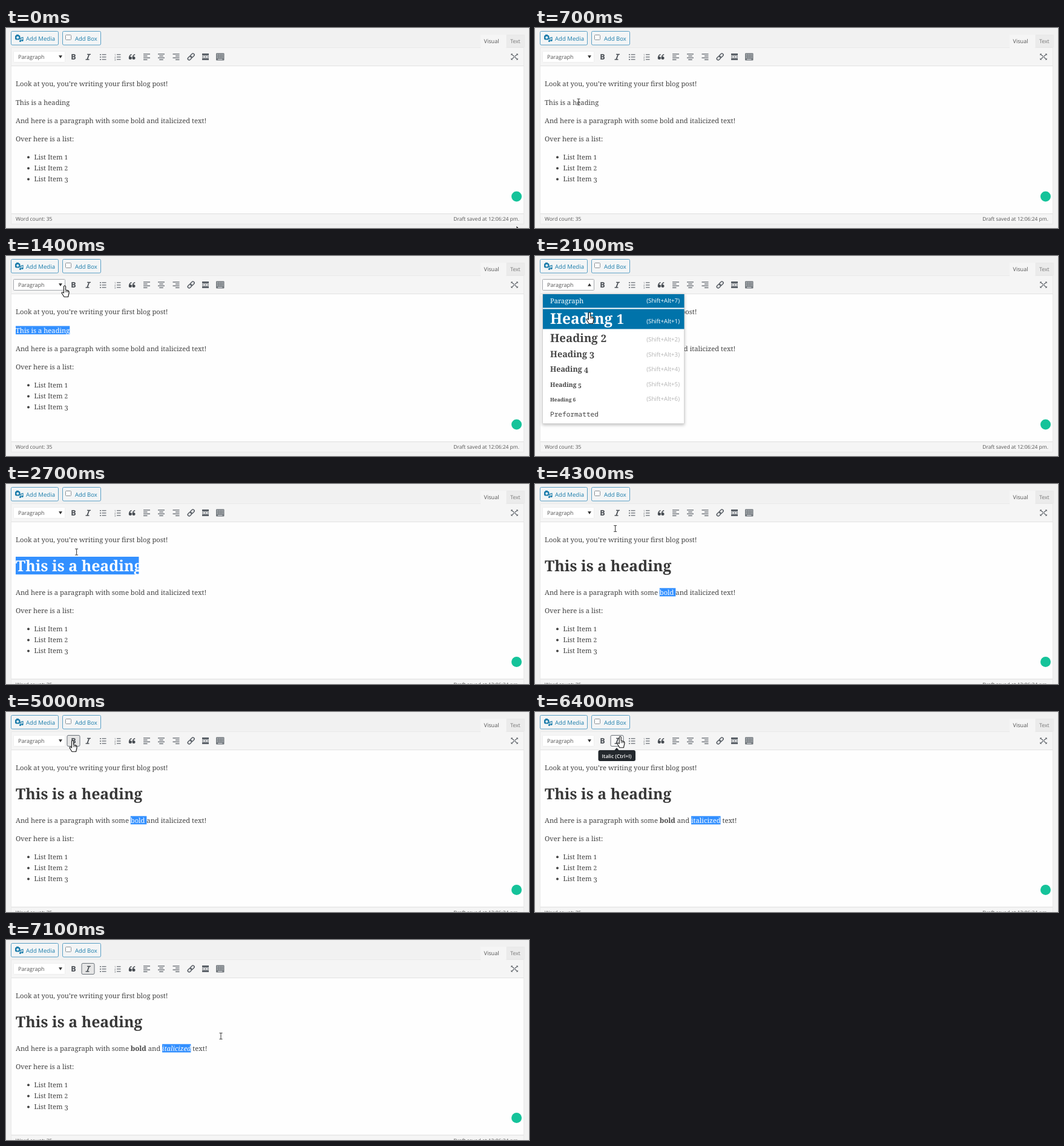
Write an HTML page with a canvas that moves like this. It is 864 by 330 pixels and loops after 7200 ms.

```html
<!DOCTYPE html>
<html lang="en">
<head>
<meta charset="utf-8">
<title>Post editor</title>
<style>
  html, body { margin: 0; width: 100%; height: 100%; overflow: hidden; background: #f1f1f1; }
  canvas { display: block; width: 864px; height: 330px; }
</style>
</head>
<body>
<canvas id="stage" width="864" height="330"></canvas>
<script>
const ctx = document.getElementById('stage').getContext('2d');
ctx.textRendering = 'geometricPrecision';

const LOOP = 7200, STEP = 100;
const INK = '#444', ICON = '#5d636a', DARK = '#474c52';
const BLUE = '#0073aa', SELECT = '#3390ff', LINK = '#1a7cab', EDGE = '#5a9fc5';
const BODY = 11.2;

// Moments at which the editor state changes
const AT = {
  pickHeading: 800, openMenu: 1700, applyHeading: 2400, pickBold: 3400, pressBold: 4900,
  applyBold: 5100, pickItalic: 5600, tip: 6200, applyItalic: 6500
};

// Pointer stops: time, x, y
const PATH = [
  [0, 843, 326], [700, 72, 122], [900, 72, 122], [1400, 97, 49], [1500, 92, 48], [1700, 92, 48],
  [2100, 90, 93], [2500, 90, 95], [3200, 224, 181], [3800, 224, 181], [4500, 110, 47],
  [5100, 110, 47], [5500, 283, 179], [5700, 283, 179], [6200, 140, 41], [6500, 141, 40],
  [7100, 355, 158.5], [7200, 355, 158.5]
];

function pointerAt(t) {
  const i = Math.max(1, PATH.findIndex(stop => stop[0] > t));
  const [t0, x0, y0] = PATH[i - 1], [t1, x1, y1] = PATH[i];
  const u = (t - t0) / (t1 - t0), e = u * u * (3 - 2 * u);
  return { x: x0 + (x1 - x0) * e, y: y0 + (y1 - y0) * e };
}

function box(x, y, w, h, fill, stroke, radius = 0) {
  ctx.beginPath();
  ctx.roundRect(x, y, w, h, radius);
  if (fill) { ctx.fillStyle = fill; ctx.fill(); }
  if (stroke) { ctx.strokeStyle = stroke; ctx.lineWidth = 1; ctx.stroke(); }
}

function dot(x, y, r, fill) {
  ctx.beginPath();
  ctx.arc(x, y, r, 0, Math.PI * 2);
  ctx.fillStyle = fill;
  ctx.fill();
}

function poly(points, fill, stroke, width = 1) {
  ctx.beginPath();
  points.forEach(([x, y]) => ctx.lineTo(x, y));
  if (fill) { ctx.closePath(); ctx.fillStyle = fill; ctx.fill(); }
  if (stroke) { ctx.strokeStyle = stroke; ctx.lineWidth = width; ctx.stroke(); }
}

function text(str, x, y, size, color, { weight = '', family = '"Open Sans", sans-serif', align = 'left' } = {}) {
  ctx.font = `${weight} ${size}px ${family}`;
  ctx.textAlign = align;
  ctx.fillStyle = color;
  ctx.fillText(str, x, y);
  return ctx.measureText(str).width;
}

// Serif text with old-style figures; returns the x where it ends
function serif(str, x, y, size, color, weight = '') {
  for (const part of str.split(/(\d)/)) {
    const small = /^[12]$/.test(part), low = /^[345]$/.test(part);
    x += text(part, x, y + (low ? size * 0.15 : 0), small ? size * 0.9 : size, color,
      { weight, family: '"Noto Serif", serif' });
  }
  return x;
}

// One line of styled runs, each optionally selected
function runs(list, x, y, size = BODY) {
  for (const { str, weight = '', selected, color = INK } of list) {
    if (selected) {
      ctx.font = `${weight} ${size}px "Noto Serif", serif`;
      box(x, y - size * 0.98, ctx.measureText(str).width, size * 1.22, SELECT);
    }
    // Bold letters run slightly wider
    x = serif(str, x, y, weight === 'bold' ? size * 1.03 : size, selected ? '#fff' : color, weight);
  }
}

function drawFrame(shift) {
  box(0, 0, 864, 330, '#f1f1f1');
  box(8.5, 32.5, 847, 291 + shift, '#f5f5f5', '#e9e9e9');
  box(784, 11, 42, 22, '#f5f5f5');
  box(827.5, 11.5, 29, 20, '#ebebeb', '#e8e8e8');
  text('Visual', 789.5, 25, 9.1, '#555');
  text('Text', 833, 25, 8.8, '#777');
  box(9, 62, 846, 244 + shift, '#fefefe');
  box(9, 62, 846, 1, '#e2e2e2');
  box(9, 306 + shift, 846, 1, '#dedede');
  text('Word count: 35', 16, 318 + shift, 8.5, '#555');
  text('Draft saved at 12:06:24 pm.', 848, 318 + shift, 8.5, '#555', { align: 'right' });
  dot(843.5, 278 + shift, 8.5, '#15c39a');
}

function drawMediaButtons() {
  box(8.5, 5.5, 78, 22.5, '#f3f5f6', EDGE, 2);
  box(93.5, 5.5, 63, 22.5, '#f3f5f6', EDGE, 2);
  text('Add Media', 33, 21, 9.6, LINK);
  text('Add Box', 114, 21, 9.5, LINK);
  box(98.5, 11.5, 9, 8, '#fff', '#8a8f94', 1);
  // Camera and note
  box(15, 12, 8.5, 7.5, LINK, null, 2);
  box(17, 10.8, 4, 2, LINK);
  dot(19.3, 15.8, 2, '#f3f5f6');
  dot(23.5, 21.5, 1.6, LINK);
  dot(27, 20.5, 1.6, LINK);
  poly([[24.6, 21.5], [24.6, 16.5], [28, 15.5], [28, 20.5]], null, LINK, 1.1);
}

function drawTools(state) {
  const { hoverList, menuOpen, bold, italic, pointer } = state;
  box(12.5, 38.5, 85, 18, '#fff', hoverList ? '#a5a9ad' : '#eee', 1);
  text('Paragraph', 20, 51, 9.05, '#555');
  const a = menuOpen ? -1 : 1;
  poly([[87, 47.5 - 2.2 * a], [93, 47.5 - 2.2 * a], [90, 47.5 + 2.6 * a]], '#333');

  const button = (cx, active) => {
    const over = Math.abs(pointer.x - cx) < 11 && Math.abs(pointer.y - 47.5) < 10;
    if (active || over) box(cx - 10.5, 38.5, 21, 18, active ? '#e6e6e6' : '#fafafa', '#6a7178', 2);
  };
  button(111.5, bold);
  button(135.5, italic);
  text('B', 111.5, 52, 12.5, DARK, { weight: 'bold', align: 'center' });
  poly([[134, 43.5], [140, 43.5]], null, DARK, 1.4);
  poly([[137.3, 43.5], [134.2, 52]], null, DARK, 1.7);
  poly([[131.5, 52], [137.5, 52]], null, DARK, 1.4);

  const bar = (x, y, w, h = 1.2) => box(x, y, w, h, ICON);
  for (let i = 0; i < 3; i++) {
    const y = 43.3 + i * 4;
    dot(156, y + 0.6, 1, ICON);
    bar(158.5, y, 7);
    text(String(i + 1), 179, y + 2.3, 4.4, ICON);
    bar(183, y, 6.5);
  }
  for (const x of [205.3, 211]) {
    dot(x, 49.5, 2.5, DARK);
    ctx.beginPath();
    ctx.moveTo(x - 1.7, 49);
    ctx.quadraticCurveTo(x - 1.4, 44.5, x + 2.2, 43.7);
    ctx.strokeStyle = DARK;
    ctx.lineWidth = 1.5;
    ctx.stroke();
  }
  [227, 251, 275.5].forEach((x, align) => {
    for (let i = 0; i < 4; i++) {
      const w = i % 2 ? 6.5 : 11;
      bar(x + (11 - w) * align / 2, 42.4 + i * 3.1, w, 1.3);
    }
  });

  // Chain link
  ctx.save();
  ctx.translate(305.7, 47.5);
  ctx.rotate(-Math.PI / 4);
  ctx.strokeStyle = ICON;
  ctx.lineWidth = 1.6;
  for (const x of [-6.6, -0.6]) {
    ctx.beginPath();
    ctx.roundRect(x, -2.3, 7.2, 4.6, 2.2);
    ctx.stroke();
  }
  ctx.restore();

  bar(324, 42, 11, 3.6);
  for (let i = 0; i < 3; i++) bar(324 + i * 4.2, 47, 2.7, 1.3);
  bar(324, 49.6, 11, 3.4);

  box(347, 41.5, 13.5, 12, '#71777c', null, 1);
  for (let i = 0; i < 12; i++) box(348.4 + (i % 4) * 3, 43 + Math.floor(i / 4) * 2.6, 1.7, 1.3, '#d4d7da');
  box(350, 51, 7.5, 1.2, '#d4d7da');

  // Expand arrows
  for (const sx of [-1, 1]) for (const sy of [-1, 1]) {
    const p = (x, y) => [840 + sx * x, 47.5 + sy * y];
    poly([p(0.5, 0.5), p(4, 3.5)], null, ICON, 1.2);
    poly([p(5.6, 4.9), p(2.7, 4.9), p(5.6, 2.2)], DARK);
  }
}

function drawPost(t) {
  const big = t >= AT.applyHeading, dy = big ? 26 : 0;
  runs([{ str: 'Look at you, you\u2019re writing your first blog post!' }], 16, 96);

  const headingPicked = t >= AT.pickHeading && t < AT.pickBold;
  runs([{ str: 'This is a heading', weight: big ? 'bold' : '', selected: headingPicked, color: big ? '#383838' : INK }],
    16, big ? 143.5 : 126.5, big ? 24.1 : BODY);

  const boldPicked = t >= AT.pickBold && t < AT.pickItalic;
  runs([
    { str: 'And here is a paragraph with some ' },
    { str: 'bold' + (boldPicked ? ' ' : ''), weight: t >= AT.applyBold ? 'bold' : '', selected: boldPicked },
    { str: (boldPicked ? '' : ' ') + 'and ' },
    { str: 'italicized', weight: t >= AT.applyItalic ? 'italic' : '', selected: t >= AT.pickItalic },
    { str: ' text!' }
  ], 16, 156.7 + dy);

  runs([{ str: 'Over here is a list:' }], 16, 187 + dy);
  for (let i = 0; i < 3; i++) {
    const y = 217 + i * 18.1 + dy;
    dot(37, y - 3.7, 2, INK);
    runs([{ str: `List Item ${i + 1}` }], 46.5, y);
  }
}

function drawMenu(pointer) {
  ctx.save();
  ctx.shadowColor = 'rgba(0,0,0,.25)';
  ctx.shadowBlur = 5;
  ctx.shadowOffsetY = 2;
  box(12, 62, 235, 215, '#fff');
  ctx.restore();
  box(12.5, 62.5, 234, 214, null, '#d5d5d5');

  const overHeading = pointer.y > 87 && pointer.y < 120;
  box(13, 63, 233.5, 22.5, BLUE);
  if (overHeading) box(13, 87.5, 233.5, 33, BLUE);

  const items = [[78, 11.1], [112, 24.5], [141.5, 18.7], [167, 14.5], [191, 12.5], [216, 10.3], [240, 8.4]];
  items.forEach(([y, size], i) => {
    const lit = i === 0 || (i === 1 && overHeading);
    serif(i ? `Heading ${i}` : 'Paragraph', 25, y, size, lit ? '#fff' : INK, i ? 'bold' : '');
    text(`(Shift+Alt+${i || 7})`, 239, y - 0.7, 9.7, lit ? '#fff' : '#b4b4b4', { align: 'right' });
  });
  text('Preformatted', 25, 264.5, 11.1, INK, { family: '"Noto Sans Mono", monospace' });
}

function drawTip() {
  poly([[131, 63.5], [139, 63.5], [135, 59]], '#23282d');
  box(104.5, 63, 61.5, 18, '#23282d', null, 3);
  text('Italic (Ctrl+I)', 135, 75.6, 8.4, '#fff', { weight: '600', align: 'center' });
}

function drawPointer({ x, y }, menuOpen) {
  ctx.save();
  ctx.translate(x, y);
  ctx.lineJoin = 'round';
  if (menuOpen || y < 62) {
    ctx.beginPath();
    ctx.moveTo(-1.5, 1);
    ctx.quadraticCurveTo(0, -1, 1.5, 1);
    ctx.lineTo(1.5, 7);
    ctx.lineTo(6, 8.2);
    ctx.quadraticCurveTo(7.5, 9, 7.2, 11.5);
    ctx.lineTo(5.6, 18.5);
    ctx.lineTo(-1, 18.5);
    ctx.lineTo(-5, 12);
    ctx.quadraticCurveTo(-5, 9.5, -1.5, 12);
    ctx.closePath();
    ctx.fillStyle = '#fff';
    ctx.fill();
    ctx.strokeStyle = '#222';
    ctx.lineWidth = 1.2;
    ctx.stroke();
    for (const fx of [1.7, 3.7, 5.5]) poly([[fx, 8], [fx, 11]], null, '#222', 0.8);
  } else if (y > 306) {
    poly([[0, 0], [0, 14], [3.3, 11], [5.5, 16], [7.7, 15], [5.5, 10.2], [10, 10]], '#222', '#fff', 0.8);
  } else {
    poly([[-2.5, -5], [2.5, -5]], null, '#444');
    poly([[0, -5], [0, 5]], null, '#444', 1.1);
    poly([[-2.5, 5], [2.5, 5]], null, '#444');
  }
  ctx.restore();
}

function render(t) {
  const pointer = pointerAt(t);
  const menuOpen = t >= AT.openMenu && t < AT.applyHeading;
  const overList = pointer.x > 12 && pointer.x < 98 && pointer.y > 38 && pointer.y < 57;
  drawFrame(t >= AT.applyHeading ? 15.5 : 0);
  drawMediaButtons();
  drawTools({
    pointer, menuOpen,
    hoverList: menuOpen || overList,
    bold: t >= AT.pressBold && t < AT.pickItalic,
    italic: t >= AT.applyItalic
  });
  drawPost(t);
  if (menuOpen) drawMenu(pointer);
  if (t >= AT.tip && t < AT.applyItalic) drawTip();
  drawPointer(pointer, menuOpen);
}

const start = performance.now();
function tick() {
  const t = (performance.now() - start) % LOOP;
  render(Math.floor(t / STEP) * STEP);
  requestAnimationFrame(tick);
}
tick();
</script>
</body>
</html>
```
